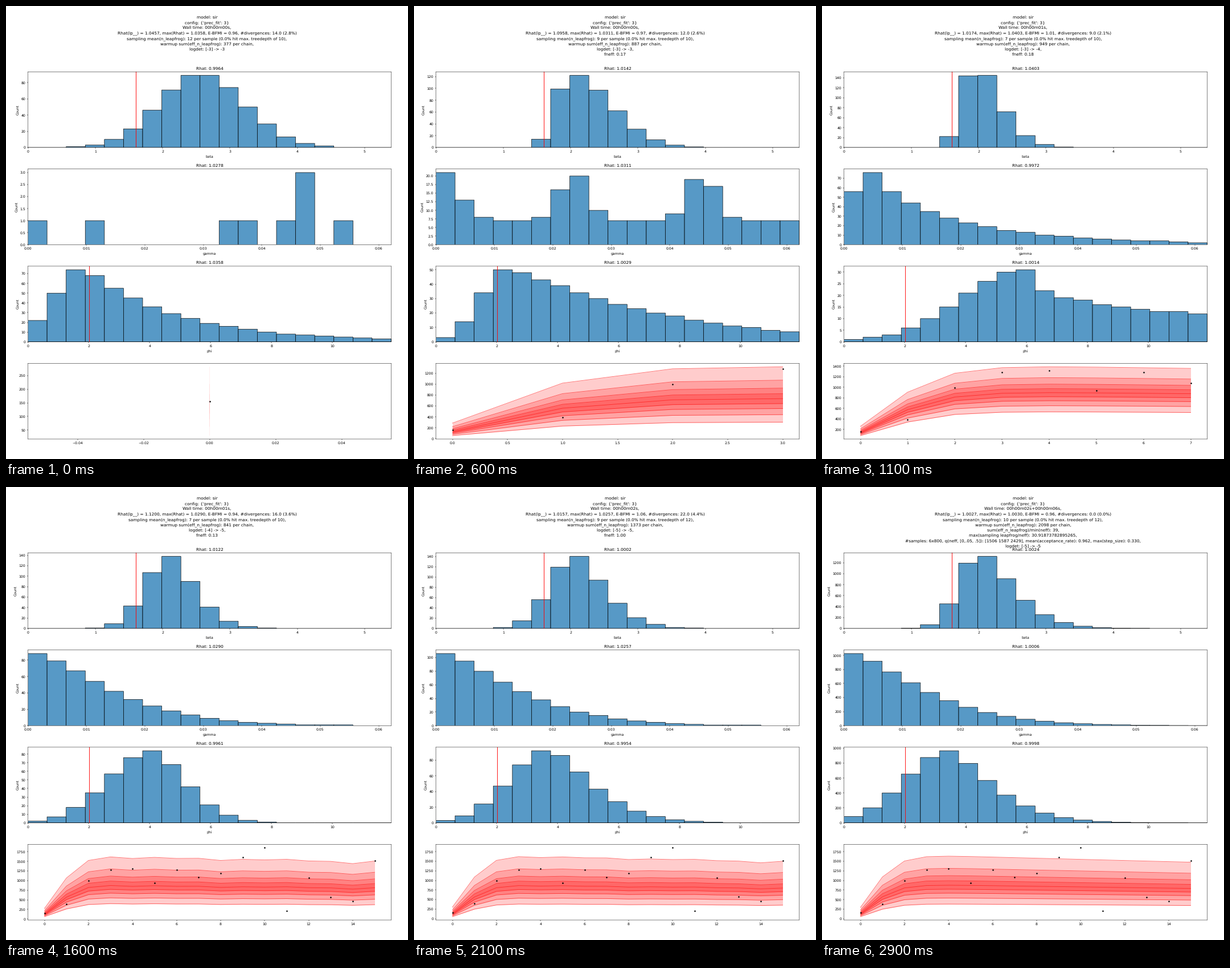
Recreate the animation shown at these times as a matplotlib script. Size 706 by 794 pixels, loop 3.1 s.

```python
import numpy as np
import matplotlib.pyplot as plt
from matplotlib.animation import FuncAnimation

plt.rcParams.update({"path.snap": False, "text.hinting": "no_hinting"})

DPI = 44.125
W, H = 706, 794
BINS = 19
# name, upper x limit, true value
PARAMS = [("beta", 5.394, 1.606), ("gamma", 0.06214, 0.0), ("phi", 11.934, 2.022)]
OBSERVED = [155, 390, 995, 1280, 1313, 937, 1280, 1080,
            1190, 1605, 1853, 205, 1065, 570, 460, 1510]
# place of each quantile between median (0) and outermost (+-1)
SPREAD = [1, 0.58, 0.33, 0.155, 0, -0.21, -0.42, -0.68, -1]
BIN = np.arange(BINS)


def scaled(shape, peak):
    return np.round(peak * shape / shape.max())


def hump(peak, mode, left, right, power=2.0):
    """Bell with its own width on each side and a free tail power on the right."""
    d = BIN - mode
    z = np.where(d < 0, (np.abs(d) / left) ** 2, (np.abs(d) / right) ** power)
    return scaled(np.exp(-z), peak)


def waves(peak, period):
    crest = ((1 + np.cos(2 * np.pi * BIN / period)) / 2) ** 4
    return scaled(0.35 + 0.65 * crest, peak)


def sparse(*counts):
    return np.pad(counts, (0, BINS - len(counts)))


def fan(n, start, plateau, rate=0.85, rough=0.0):
    """Quantile curves that climb from start to a slowly sinking plateau."""
    x = np.arange(n)
    rise = 1 - np.exp(-rate * x ** 1.33)
    rng = np.random.default_rng(4)
    level = (1.03 - 0.009 * x) * (1 + rough * rng.standard_normal(n))
    top, mid, low = [a + (b * level - a) * rise for a, b in zip(start, plateau)]
    return [mid + s * (top - mid if s > 0 else mid - low) for s in SPREAD]


def header(secs, lp, rmax, bfmi, div, leap, depth, warm, *tail):
    return ["model: sir", "config: {'prec_fit': 3}", f"Wall time: {secs},",
            f"Rhat(lp__) = {lp}, max(Rhat) = {rmax}, E-BFMI = {bfmi}, #divergences: {div}",
            f"sampling mean(n_leapfrog): {leap} per sample (0.0% hit max. treedepth of {depth}),",
            f"warmup sum(eff_n_leapfrog): {warm} per chain,", *tail]


# header lines, Rhat of each parameter, histograms, quantile curves
SCENES = [
    (header("00h00m00s", "1.0457", "1.0358", "0.96", "14.0 (2.8%)", 12, 10, 377,
            "logdet: [-3] -> -3"),
     ("0.9964", "1.0278", "1.0358"),
     (hump(89, 8.5, 3.0, 3.25),
      sparse(1, 0, 0, 1, 0, 0, 0, 0, 0, 0, 1, 1, 0, 1, 3, 0, 1),
      hump(74, 2.4, 2.15, 4.8, 1)),
     fan(1, (282, 132, 30), (0, 0, 0))),

    (header("00h00m00s", "1.1467", "1.0610", "0.55", "15.0 (6.0%)", 11, 10, 898,
            "logdet: [-3] -> -3,", "fneff: 0.78"),
     ("1.0420", "1.0610", "1.0553"),
     (hump(60, 8.6, 2.2, 2.4, 1.7),
      sparse(2, 1, 6, 2, 4, 2, 0, 1, 0, 1, 2, 0, 1, 1),
      hump(26, 4.3, 4, 6, 0.9)),
     fan(2, (272, 132, 48), (1094, 565, 233))),

    (header("00h00m00s", "1.0958", "1.0311", "0.97", "12.0 (2.6%)", 9, 10, 887,
            "logdet: [-3] -> -3,", "fneff: 0.17"),
     ("1.0142", "1.0311", "1.0029"),
     (hump(122, 6.5, 1.02, 2.97), waves(21, 6.7), hump(50, 3.3, 2, 8.2, 1.15)),
     fan(4, (285, 130, 55), (1325, 737, 303), 1.17)),

    (header("00h00m01s", "1.0174", "1.0403", "1.01", "9.0 (2.1%)", 7, 10, 949,
            "logdet: [-3] -> -4,", "fneff: 0.18"),
     ("1.0403", "0.9972", "1.0014"),
     (hump(145, 6.4, 0.98, 1.75, 1.7), hump(76, 1, 1.8, 4, 0.85),
      hump(31, 9, 4.7, 10.3, 0.46)),
     fan(8, (260, 145, 84), (1405, 908, 540), 0.8)),

    (header("00h00m01s", "1.1200", "1.0290", "0.94", "16.0 (3.6%)", 7, 10, 841,
            "logdet: [-4] -> -5,", "fneff: 0.13"),
     ("1.0122", "1.0290", "0.9961"),
     (hump(138, 6.9, 1.75, 1.85, 1.6), hump(88, 0, 1, 5, 1.4), hump(84, 6, 3.2, 2.5, 1.7)),
     fan(16, (275, 130, 64), (1630, 880, 404), rough=0.015)),

    (header("00h00m02s", "1.0157", "1.0257", "1.06", "22.0 (4.4%)", 9, 12, 1373,
            "logdet: [-5] -> -5,", "fneff: 1.00"),
     ("1.0002", "1.0257", "0.9954"),
     (hump(140, 6.8, 1.85, 2.1, 1.55), hump(106, 0, 1, 4.9, 1.4),
      hump(92, 5.4, 2.9, 3.1, 1.5)),
     fan(16, (304, 130, 55), (1640, 875, 387), rough=0.01)),

    (header("00h00m02s+00h00m06s", "1.0027", "1.0030", "0.96", "0.0 (0.0%)", 10, 12, 2098,
            "sum(eff_n_leapfrog)/min(neff): 39,",
            "max(sampling leapfrog/neff): 30.91873782895265,",
            "#samples: 6x800, q(neff, [0,.05, .5]): [1506 1587 2429], "
            "mean(acceptance_rate): 0.962, max(step_size): 0.330,",
            "logdet: [-5] -> -5"),
     ("1.0024", "1.0006", "0.9998"),
     (hump(1318, 6.6, 1.5, 2.4, 1.55), hump(1026, 0, 1, 4.8, 1.4),
      hump(966, 5, 3.2, 3.1, 1.45)),
     fan(16, (298, 133, 58), (1650, 885, 388))),
]

fig = plt.figure(figsize=(16, 17.995), dpi=DPI, facecolor="white")
axes = [fig.add_axes([38.5 / W, (35 + 170.33 * k) / H, 638 / W, 132.7 / H])
        for k in (3, 2, 1, 0)]
lines = [fig.text(0.5, 1 - (21.8 + 9.3 * k) / H, "", ha="center", va="baseline", size=12)
         for k in range(10)]


def draw_hist(ax, counts, rhat, name, limit, truth):
    width = limit / BINS
    ax.bar(BIN * width, counts, width, align="edge", lw=1.1,
           facecolor=(0.122, 0.467, 0.706, 0.75), edgecolor="black")
    ax.axvline(truth, color="red")
    ax.set(xlim=(0, limit), ylim=(0, 1.05 * counts.max()),
           ylabel="Count", title=f"Rhat: {rhat}")
    ax.set_xlabel(name, labelpad=5)


def draw_fit(ax, curves):
    x = np.arange(len(curves[0]))
    for k in range(4):
        if len(x) == 1:
            ax.vlines(x, curves[-1 - k], curves[k], color="red", alpha=0.2, lw=0.5)
        else:
            ax.fill_between(x, curves[k], curves[-1 - k], color="red", alpha=0.2, lw=0)
    for curve in curves:
        ax.plot(x, curve, color="red", alpha=0.55)
    ax.plot(x, OBSERVED[:len(x)], "k.")


def update(i):
    head, rhats, hists, curves = SCENES[(i + 4) // 5]
    for k, line in enumerate(lines):
        line.set_text(head[k] if k < len(head) else "")
    for ax in axes:
        ax.clear()
    for ax, counts, rhat, param in zip(axes, hists, rhats, PARAMS):
        draw_hist(ax, counts, rhat, *param)
    draw_fit(axes[3], curves)
    return axes


anim = FuncAnimation(fig, update, frames=31, interval=100, init_func=lambda: update(0),
                     repeat=True, repeat_delay=0, blit=False)
plt.show()
```
